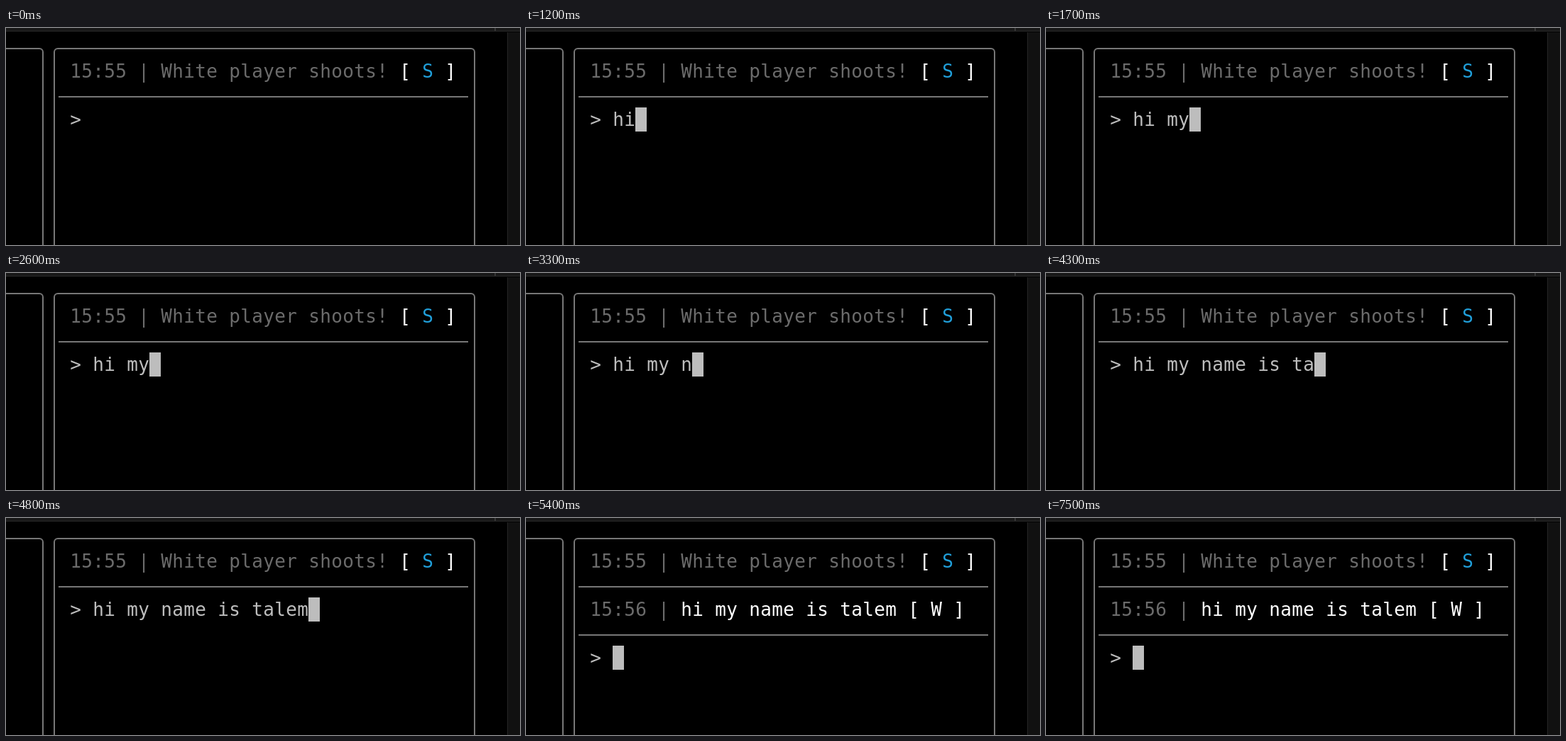
Recreate the animation shown at these times as an HTML page with a canvas. Size 724 by 306 pixels, loop 7600 ms.

```html
<!DOCTYPE html>
<html lang="en">
<head>
<meta charset="utf-8">
<title>Terminal chat</title>
<style>
  html, body { margin: 0; width: 100%; height: 100%; overflow: hidden; background: #000; }
  canvas { display: block; }
</style>
</head>
<body>
<canvas id="stage" width="724" height="306"></canvas>
<script>
const ctx = document.getElementById('stage').getContext('2d');

const LOOP = 7600, CURSOR_ON = 600, SENT = 5200;
const CELL = 16, ROW = 34, LEFT = 90, TOP = 44;
const MUTED = '#6b6b6b', LINE = '#777', INPUT = '#bdbdbd', WHITE = '#fff', BLUE = '#209fda';
const MESSAGE = 'hi my name is talem';

// [time, number of message characters typed]; drops are backspaces
const TYPING = [
  [0, 0], [1200, 2], [1300, 3], [1700, 5], [2100, 3], [2400, 4], [2500, 5],
  [2700, 6], [2900, 5], [3100, 6], [3300, 7], [3400, 8], [3500, 10], [3600, 11],
  [3800, 13], [3900, 14], [4200, 15], [4300, 16], [4400, 17], [4500, 18], [4600, 19]
];

// Draw text on the terminal grid, one character per cell
function write(text, col, row, color) {
  ctx.fillStyle = color;
  [...text].forEach((ch, i) =>
    ctx.fillText(ch, LEFT + (col + i + 0.5) * CELL, TOP + row * ROW + 26));
}

function rect(x, y, w, h, color) {
  ctx.fillStyle = color;
  ctx.fillRect(x, y, w, h);
}

function panel(x, width) {
  ctx.strokeStyle = LINE;
  ctx.lineWidth = 2;
  ctx.beginPath();
  ctx.roundRect(x, 29, width, 400, 5);
  ctx.stroke();
}

function separator(row) {
  rect(74, TOP + row * ROW - 16, 577, 2, LINE);
}

function chatLine(row, time, text, color, tag, tagColor) {
  write(time + ' |', 0, row, MUTED);
  write(text, 8, row, color);
  const col = 9 + text.length;
  write('[   ]', col, row, WHITE);
  write(tag, col + 2, row, tagColor);
}

function prompt(row, text, cursor) {
  if (cursor) rect(LEFT + (2 + text.length) * CELL, TOP + row * ROW, CELL, ROW, INPUT);
  write('> ' + text, 0, row, INPUT);
}

function windowChrome() {
  rect(0, 0, 724, 4, '#181818');
  rect(0, 4, 724, 1, '#292929');
  rect(688, 0, 2, 4, '#363636');
  rect(706, 6, 18, 300, '#111');
  rect(706, 6, 1, 300, '#242424');
}

function draw(t) {
  rect(0, 0, 724, 306, '#000');
  windowChrome();
  panel(-300, 352);
  panel(68, 592);
  ctx.font = '26px "DejaVu Sans Mono", monospace';
  ctx.textAlign = 'center';

  chatLine(0, '15:55', 'White player shoots!', MUTED, 'S', BLUE);
  separator(2);
  if (t >= SENT) {
    chatLine(2, '15:56', MESSAGE, WHITE, 'W', WHITE);
    separator(4);
    prompt(4, '', true);
  } else {
    const typed = TYPING.findLast(([time]) => time <= t)[1];
    prompt(2, MESSAGE.slice(0, typed), t >= CURSOR_ON);
  }
}

const start = performance.now();
function frame() {
  draw((performance.now() - start) % LOOP);
  requestAnimationFrame(frame);
}
frame();
</script>
</body>
</html>
```
